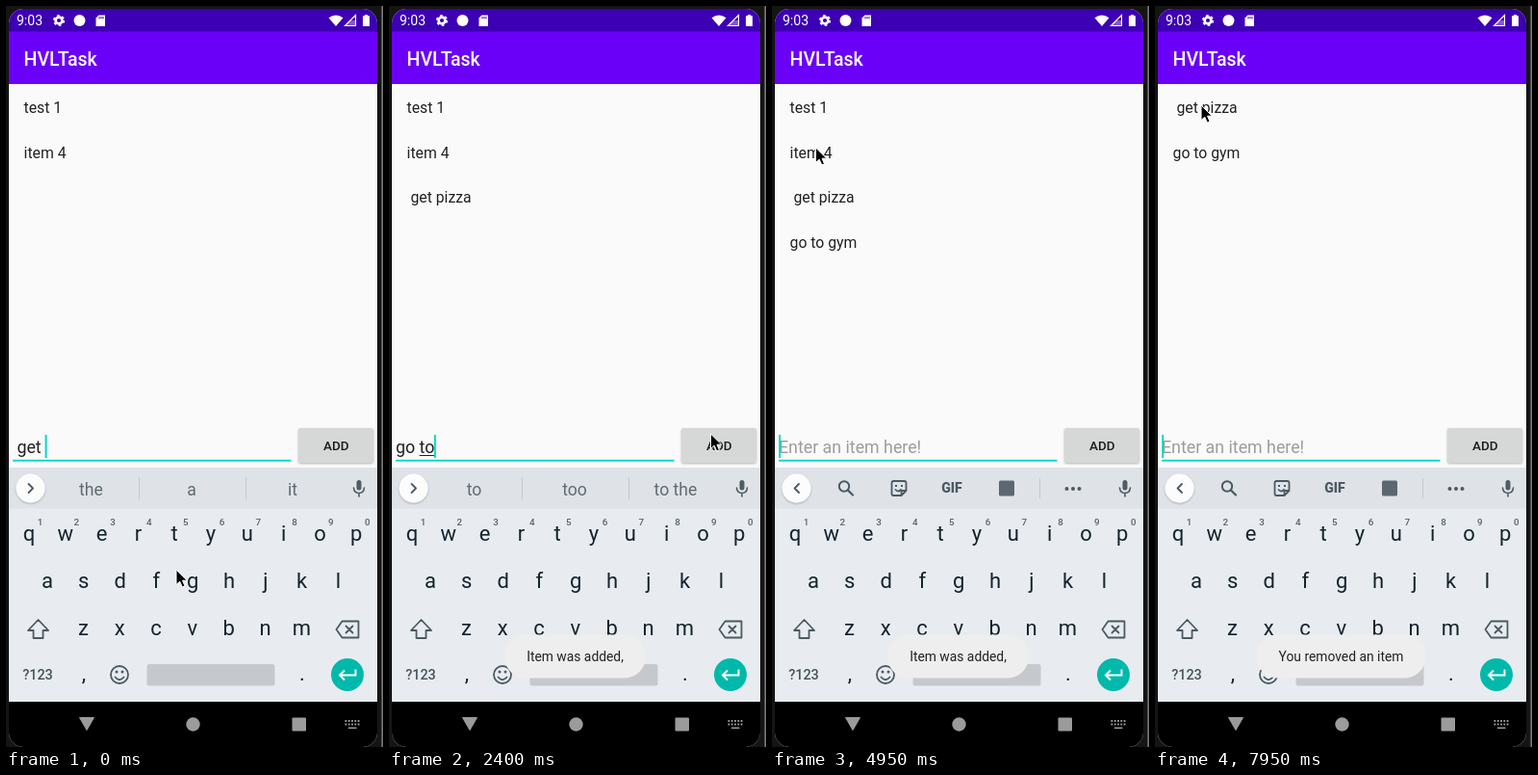
An HTML page that plays this animation: 392 px wide and 769 px high, repeating every 8 s.

```html
<!DOCTYPE html>
<html lang="en">
<head>
<meta charset="utf-8">
<title>To-do list</title>
<style>
  html, body { margin: 0; width: 100%; height: 100%; overflow: hidden; background: #151515; }
  svg { display: block; width: 100vw; height: 100vh; }
  text { font-family: Roboto, "Open Sans", sans-serif; white-space: pre; }
  .mid { text-anchor: middle; }
  .med { font-weight: 500; }
  .line { fill: none; stroke: #4b5a63; stroke-width: 1.8; stroke-linejoin: round; stroke-linecap: round; }
</style>
</head>
<body>
<svg id="stage" viewBox="0 0 392 769" preserveAspectRatio="none">
  <defs>
    <clipPath id="screen"><rect x="3" y="3" width="383" height="766" rx="15"/></clipPath>
    <filter id="soft" x="-10%" y="-20%" width="120%" height="150%">
      <feDropShadow dx="0" dy="1" stdDeviation="1" flood-opacity=".28"/>
    </filter>
  </defs>
  <rect x="390.500" width="1.500" height="769" fill="#808080"/>
  <g clip-path="url(#screen)">
    <rect x="3" y="3" width="383" height="766" fill="#fafafa"/>
    <rect x="3" y="3" width="383" height="24" fill="#3d00b4"/>
    <rect x="3" y="26.5" width="383" height="54.5" fill="#6b00f8"/>
    <g id="status" fill="#fff">
      <text x="11" y="20" font-size="14">9:03</text>
      <circle cx="55" cy="15" r="3.4" fill="none" stroke="#fff" stroke-width="2.6"/>
      <circle cx="55" cy="15" r="5.1" fill="none" stroke="#fff" stroke-width="1.9" stroke-dasharray="2.67 2.67"/>
      <circle cx="76.500" cy="15" r="6"/>
      <path d="M96.500 9.500H103V21H93.500V12.500Z"/>
      <path d="M97 11v2.400M99 11v2.400M101 11v2.400" stroke="#3d00b4"/>
      <path d="M335.500 12.300Q343 6.500 350.500 12.300L343 21Z"/>
      <path d="M363.500 9.500V20.500H352.500Z" fill="none" stroke="#fff" stroke-width="1.200"/>
      <path d="M363.500 15V20.500H352.500L358 15Z" opacity=".35"/>
      <path d="M373 9h3v1.300h2V21h-7V10.300h2Z"/>
    </g>
    <text class="med" x="18.600" y="62" font-size="19.500" fill="#fff">HVLTask</text>
    <g id="list" font-size="15.750" fill="#212121"></g>

    <rect x="7" y="470.800" width="289.500" height="1.900" fill="#03dac5"/>
    <text id="field" x="7" y="464" font-size="17.800"></text>
    <rect id="under" y="466" height="1" fill="#212121"/>
    <rect id="caret" y="445" width="2" height="24" fill="#03dac5"/>
    <rect id="button" x="304" y="438" width="78" height="36" rx="2" filter="url(#soft)"/>
    <text class="mid med" x="343.300" y="461" font-size="13.500" fill="#1d1d1d">ADD</text>

    <rect x="3" y="479" width="383" height="243" fill="#e8ecf0"/>
    <rect x="3" y="479" width="383" height="42.500" fill="#dfe3e8"/>
    <circle cx="25.500" cy="500.500" r="15" fill="#fcfcfc" filter="url(#soft)"/>
    <path id="chevron" class="line" stroke-width="2"/>
    <g fill="#4f5c65">
      <rect x="364.500" y="492" width="5" height="10.500" rx="2.500"/>
      <path class="line" d="M361.500 500Q362 505.500 367 505.500T372.500 500M367 505.500V509" style="stroke-width:1.6"/>
    </g>
    <g id="words" font-size="17.600" fill="#5f6b73">
      <path d="M138.500 489V512M249.500 489V512" stroke="#c3c9cf"/>
      <text class="mid" x="88.500" y="508"></text>
      <text class="mid" x="193" y="508"></text>
      <text class="mid" x="298" y="508"></text>
      <g id="slice">
        <path d="M184.500 500Q186 493 193.500 491.500L202.500 510Z" fill="#fbc02d"/>
        <path d="M184.500 500Q186 493 193.500 491.500" fill="none" stroke="#c77b30" stroke-width="3" stroke-linecap="round"/>
        <g fill="#d84332"><circle cx="190" cy="499" r="1.900"/><circle cx="194.500" cy="497" r="1.600"/><circle cx="196.500" cy="503.500" r="1.800"/></g>
      </g>
    </g>
    <g id="tools">
      <circle class="line" cx="75" cy="498.500" r="5.200" style="stroke-width:2"/>
      <path class="line" d="M79 502.500L84 507.500" style="stroke-width:2.200"/>
      <path class="line" d="M126.500 493H137.500Q139.500 493 139.500 495V503L134.500 508H126.500Q124.500 508 124.500 506V495Q124.500 493 126.500 493ZM134.500 508V503H139.500M128.500 502Q131 505 134 502"/>
      <path d="M128 497h2v2h-2zM134 497h2v2h-2z" fill="#4b5a63"/>
      <text class="mid" x="187" y="505" font-size="14" font-weight="900" fill="#4b5a63">GIF</text>
      <rect x="236" y="492.500" width="16" height="16" rx="1.500" fill="#5b6871"/>
      <path d="M278.500 490V511" stroke="#c3c9cf"/>
      <g fill="#4b5a63"><circle cx="306.500" cy="501" r="2"/><circle cx="313" cy="501" r="2"/><circle cx="319.500" cy="501" r="2"/></g>
    </g>

    <g id="keys" fill="#14242d" font-size="22"></g>
    <path class="line" d="M33.500 637L44 648H38.500V656H28.500V648H23Z"/>
    <path class="line" d="M349.500 638.500H366.500V655.500H349.500L343.500 647ZM353.500 643.500L360.500 650.500M360.500 643.500L353.500 650.500"/>
    <text class="mid med" x="33" y="699" font-size="14.400" fill="#44535c">?123</text>
    <circle class="line" cx="118" cy="694" r="9"/>
    <path class="line" d="M113.500 696.500Q118 702 122.500 696.500"/>
    <g fill="#4b5a63"><circle cx="115" cy="691" r="1.500"/><circle cx="121" cy="691" r="1.500"/></g>
    <rect x="146.500" y="683" width="133" height="22.500" rx="2.500" fill="#c5c9ce"/>
    <circle cx="355" cy="694" r="17" fill="#00b9aa"/>
    <path d="M363.500 688.500V694.500H347.500M352 689.500L347 694.500L352 699.500" fill="none" stroke="#fff" stroke-width="2"/>

    <g id="toast">
      <rect y="652.500" height="45" rx="22" fill="#eee"/>
      <text class="mid" y="680.300" font-size="13.850" fill="#222"></text>
    </g>

    <rect x="3" y="722" width="383" height="47" fill="#000"/>
    <g fill="#9b9b9b">
      <path d="M76.500 738.500H91.500L84 751.500Z" stroke="#9b9b9b" stroke-linejoin="round"/>
      <circle cx="194.500" cy="745.500" r="7.200"/>
      <rect x="297.500" y="738.500" width="14.500" height="14" rx="1"/>
      <path d="M352.500 742H368M352.500 745.500H368" stroke="#9b9b9b" stroke-width="1.800" stroke-dasharray="1.800 1.500"/>
      <path d="M356 749.300H364.500" stroke="#9b9b9b" stroke-width="1.600"/>
    </g>
  </g>
  <path id="mouse" d="M0 0V15.500L3.700 12.200L6.300 18L9 16.800L6.500 11.200H11.300Z" fill="#000" stroke="#fff" stroke-width="1"/>
</svg>
<script>
const LOOP = 8000, STEP = 150;
const FIELD_SIZE = 17.8, TOAST_SIZE = 13.85;
const $ = id => document.getElementById(id);
const pen = document.createElement('canvas').getContext('2d');
const width = (s, size) => { pen.font = `${size}px Roboto, sans-serif`; return pen.measureText(s).width; };

// Each track is a list of [start time, value].
const typed = [
  [0, ' get '], [150, ' get p'], [300, ' get pi'], [450, ' get piz'], [600, ' get pizz'], [750, ' get pizza'],
  [1350, ''], [1800, 'g'], [1950, 'go '], [2250, 'go t'], [2400, 'go to'], [2550, 'go to '],
  [2700, 'go to g'], [2850, 'go to gy'], [3300, 'go to gym'], [3900, '']
];
const hints = [
  [0, 'the|a|it'], [150, 'p|the|a'], [300, 'pi|pic|pick'], [450, 'piz|pizza|pix'], [600, 'pizz|pizza|pizzas'],
  [750, 'pizza||Pizza'], [1500, ''], [1800, 'g|good|got'], [1950, 'to|on|back'], [2250, 't|to|the'],
  [2400, 'to|too|to the'], [2550, 'the|bed|sleep'], [2700, 'g|get|go'], [2850, 'gy|gym|guy'],
  [3300, 'gym|gymnastics|gyms'], [4050, '']
];
const lists = [
  [0, 'test 1|item 4'], [1500, 'test 1|item 4| get pizza'], [4050, 'test 1|item 4| get pizza|go to gym'],
  [5400, 'test 1| get pizza|go to gym'], [7650, ' get pizza|go to gym']
];
const carets = [[0, 1], [4350, 0], [4950, 1], [5400, 0], [5850, 1], [6300, 0], [6900, 1], [7350, 0], [7800, 1]];
const presses = [[0, '#d6d7d7'], [1200, '#b5b6b6'], [1500, '#c6c7c7'], [1650, '#d6d7d7'],
  [3750, '#b5b6b6'], [4050, '#c6c7c7'], [4200, '#d6d7d7']];
const fades = [[0, 0], [1350, .1], [1500, .8], [1650, 1], [3450, .5], [3600, 0], [3900, .1], [4050, .8], [4200, 1],
  [5700, .5], [5850, 0], [6000, .5], [6150, 1]];
const path = [[0, 177, 585], [600, 177, 585], [900, 346, 358], [1050, 334.5, 444], [3900, 334.5, 444], [4050, 300, 176],
  [4200, 152, 180], [4500, 70, 158], [4800, 45.5, 147], [5550, 45.5, 147], [6000, 48, 103], [8000, 48, 103]];

const at = (track, t) => track.filter(k => k[0] <= t).pop()[1];

function along(keys, t) {
  const i = keys.findIndex(k => k[0] > t);
  const [t0, x0, y0] = keys[i - 1], [t1, x1, y1] = keys[i];
  const p = (t - t0) / (t1 - t0);
  return [x0 + (x1 - x0) * p, y0 + (y1 - y0) * p];
}

const label = (s, x, y, extra = 'class="mid"') => `<text ${extra} x="${x}" y="${y}">${s}</text>`;
const row = (chars, x, y) => [...chars].map((c, i) => label(c, x + i * 37.8, y)).join('');

$('keys').innerHTML = row('qwertyuiop', 24, 555) + row('asdfghjkl', 43, 604) + row('zxcvbnm', 80.5, 653) +
  label(',', 81, 700) + label('.', 308, 700) +
  `<g class="med" font-size="9.800" fill="#55636c">${row('1234567890', 35.5, 539)}</g>`;

const words = $('words').querySelectorAll('text');
const [pill, note] = $('toast').children;

function drawField(text, caretOn) {
  const field = $('field'), start = text.lastIndexOf(' ') + 1;
  const left = 7 + width(text.slice(0, start), FIELD_SIZE), end = 7 + width(text, FIELD_SIZE);
  field.textContent = text || 'Enter an item here!';
  field.setAttribute('fill', text ? '#212121' : '#9c9c9c');
  $('under').setAttribute('x', left);
  $('under').setAttribute('width', end - left);
  $('caret').setAttribute('x', text ? end - .5 : 7);
  $('caret').setAttribute('opacity', caretOn);
}

function drawStrip(hint) {
  const tools = !hint;
  $('tools').style.display = tools ? '' : 'none';
  $('words').style.display = tools ? 'none' : '';
  $('chevron').setAttribute('d', tools ? 'M28 496L23.500 500.500L28 505' : 'M23.500 496L28 500.500L23.500 505');
  const parts = hint.split('|');
  words.forEach((w, i) => { w.textContent = parts[i] || ''; });
  $('slice').style.display = parts[1] === '' ? '' : 'none';
}

function drawToast(message, alpha) {
  const w = width(message, TOAST_SIZE) + 46;
  pill.setAttribute('x', 193.5 - w / 2);
  pill.setAttribute('width', w);
  note.setAttribute('x', 193.5);
  note.textContent = message;
  $('toast').setAttribute('opacity', alpha);
}

function draw(t) {
  $('list').innerHTML = at(lists, t).split('|')
    .map((s, i) => label(s, 18.6, 110.8 + i * 46.8, '')).join('');
  drawField(at(typed, t), at(carets, t));
  drawStrip(at(hints, t));
  drawToast(t < 5850 ? 'Item was added,' : 'You removed an item', at(fades, t));
  $('button').setAttribute('fill', at(presses, t));
  $('mouse').setAttribute('transform', `translate(${along(path, t)})`);
}

// The screen refreshes in fixed steps.
let last = -1;
function tick(now) {
  const t = Math.floor(now % LOOP / STEP) * STEP;
  if (t !== last) draw(last = t);
  requestAnimationFrame(tick);
}
draw(0);
requestAnimationFrame(tick);
</script>
</body>
</html>
```
